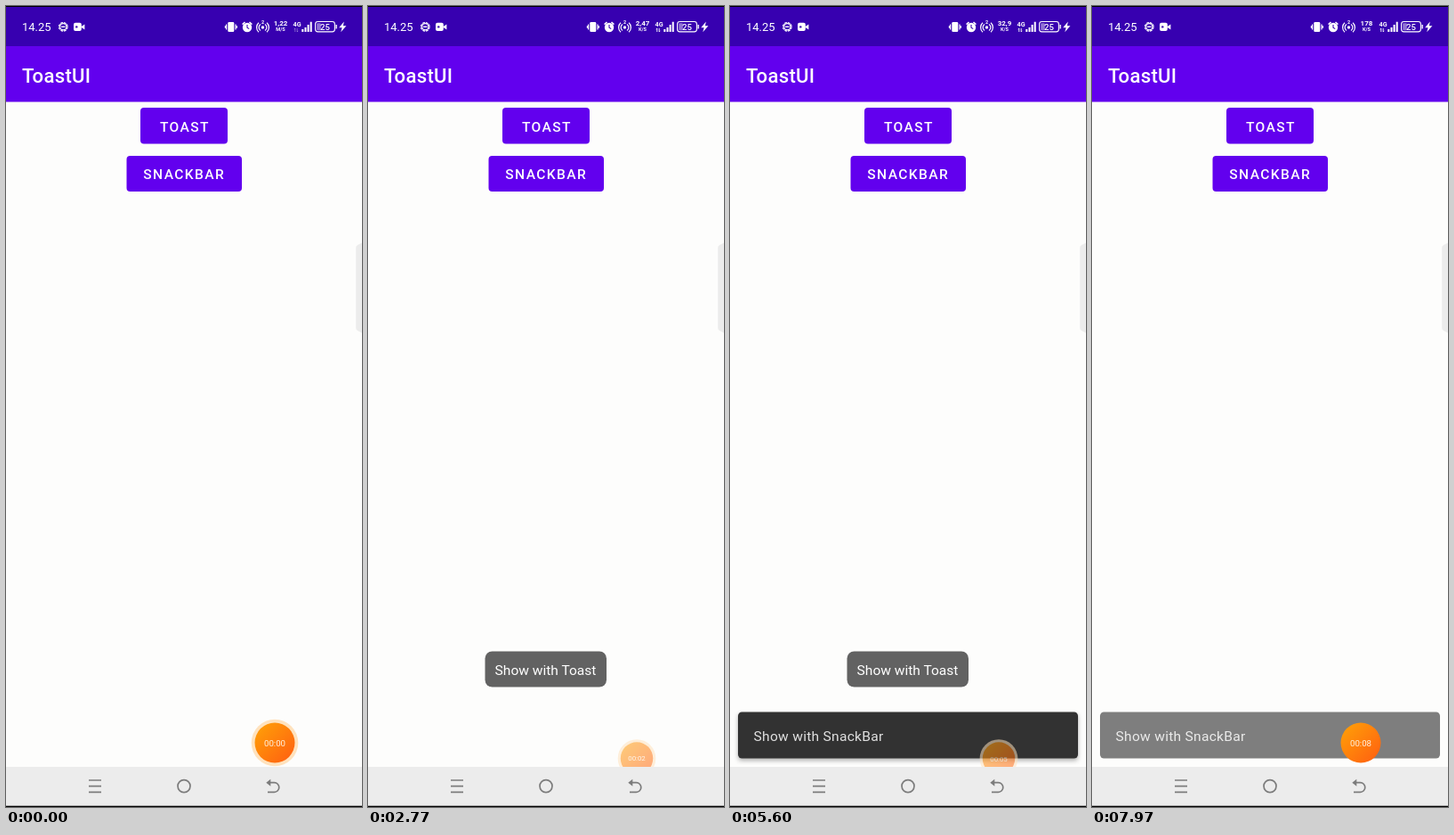
Animation of 400 by 898 pixels, one loop 8030 ms. Source, as an HTML page:

```html
<!DOCTYPE html>
<html lang="en">
<head>
<meta charset="utf-8">
<title>Toast and snackbar</title>
<style>
  html, body { margin: 0; width: 100%; height: 100%; overflow: hidden; background: #fdfdfc; }
  svg { display: block; width: 100%; height: 100%; }
  text { font-family: Roboto, sans-serif; fill: #fff; }
  .label { font-size: 15.55px; font-weight: 500; letter-spacing: 1.39px; }
  .message { font-size: 15.55px; }
  .mid { text-anchor: middle; }
  .bold { font-weight: 700; }
  .line { fill: none; stroke: #fff; }
  .nav { fill: none; stroke: #7c7c7c; stroke-width: 1.7; }
</style>
</head>
<body>
<svg viewBox="0 0 400 898">
  <defs>
    <linearGradient id="orange" x1="0" y1="0" x2="1" y2="1">
      <stop offset=".1" stop-color="#ff9c08"/>
      <stop offset=".9" stop-color="#ff6410"/>
    </linearGradient>
    <filter id="blur" x="-20%" y="-50%" width="140%" height="200%"><feGaussianBlur stdDeviation="2.5"/></filter>
    <clipPath id="aboveNav"><rect width="400" height="853"/></clipPath>
    <clipPath id="toastClip"><rect x="151" y="114" width="98" height="40.5" rx="4"/></clipPath>
    <clipPath id="snackClip"><rect x="135.5" y="168" width="129.5" height="40" rx="4"/></clipPath>
  </defs>

  <rect width="400" height="898" fill="#fdfdfc"/>
  <rect width="400" height="46" fill="#3700b0"/>
  <rect y="45" width="400" height="62.5" fill="#6200ee"/>
  <rect width="400" height="1" fill="#000"/>
  <text x="18" y="85.5" font-size="22.2" font-weight="500" letter-spacing=".28">ToastUI</text>

  <!-- status bar -->
  <text x="18" y="28" font-size="13">14.25</text>
  <g class="line" stroke-width="1.2">
    <circle cx="64.3" cy="23.3" r="4.8" stroke-dasharray="2.8 .97"/>
    <circle cx="64.3" cy="23.3" r="3.6"/>
    <path d="M62.2 23.3h4.2" stroke-width="1.4"/>
  </g>
  <rect x="76" y="18.8" width="8.8" height="9.2" rx="2" fill="#fff"/>
  <path d="M84 23.4l4.4-3v6z" fill="#fff"/>
  <circle cx="79.3" cy="23.4" r="1.2" fill="#3700b0"/>
  <rect x="249.3" y="18" width="7" height="11" rx="1.3" fill="#fff"/>
  <path class="line" stroke-width="1.2" d="M247.6 20.5v6M258 20.5v6M246.4 22.3v2.4M259.4 22.3v2.4"/>
  <circle cx="271" cy="24" r="5.2" fill="#fff"/>
  <path class="line" stroke-width="1.5" d="M265.6 20.6l2.9-2.6M276.4 20.6l-2.9-2.6"/>
  <path class="line" style="stroke:#3700b0" stroke-width="1.1" d="M271 21v3.3l2.2 1.3"/>
  <circle cx="288.5" cy="24" r="1.7" fill="#fff"/>
  <path class="line" stroke-width="1.2" d="M286 27.4a4 4 0 0 1 0-6.8M291 27.4a4 4 0 0 0 0-6.8M284 29.2a6.8 6.8 0 0 1 0-10.4M293 29.2a6.8 6.8 0 0 0 0-10.4"/>
  <text class="mid bold" x="288.5" y="20" font-size="5.5">2</text>
  <text class="mid bold" id="rate" x="308.5" y="22.3" font-size="8"></text>
  <text class="mid bold" id="unit" x="308.5" y="28.3" font-size="5.6"></text>
  <text class="bold" x="322.6" y="22.6" font-size="7.2">4G</text>
  <path id="arrows" class="line" stroke-width=".9" d="M324.8 29v-4l-1 1.2M327.2 25v4l1-1.2"/>
  <path class="line" stroke-width="2" d="M333.3 29v-3M336.5 29v-5M339.6 29v-8M342.7 29v-11.3"/>
  <rect class="line" x="347.6" y="17.5" width="21.8" height="11.4" rx="2.8" stroke-width="1.1"/>
  <rect x="349.2" y="19.2" width="4.6" height="8" rx="1" fill="#fff" opacity=".45"/>
  <path class="line" stroke-width="1.4" d="M371.2 21v4.4"/>
  <text class="mid" x="358.4" y="26.7" font-size="9.6" font-weight="500">25</text>
  <path d="M379.8 17.4l-5.6 6.8h3.4l-1.4 5 6.2-7h-3.6z" fill="#fff"/>

  <!-- buttons -->
  <rect x="151" y="114" width="98" height="40.5" rx="4" fill="#6200ee"/>
  <circle id="toastRipple" cx="200" cy="134" fill="#fff" clip-path="url(#toastClip)"/>
  <text class="label" x="173" y="140.7">TOAST</text>
  <rect x="135.5" y="168" width="129.5" height="40" rx="4" fill="#6200ee"/>
  <circle id="snackRipple" cx="200" cy="188" fill="#fff" clip-path="url(#snackClip)"/>
  <text class="label" x="154.3" y="194.2">SNACKBAR</text>

  <path d="M400 265.5l-5 2.5q-1.8 1-1.8 3v90q0 2 1.8 3l5 2.5z" fill="#ececec"/>

  <g clip-path="url(#aboveNav)">
    <g id="snackbar">
      <rect id="shadow" x="9" y="794" width="382" height="52" rx="4" fill="#555" filter="url(#blur)"/>
      <rect x="9" y="791.5" width="382" height="52" rx="4.4" fill="#323232"/>
      <text class="message" x="26.6" y="823.5" letter-spacing=".28" style="fill:#e0e0e0">Show with SnackBar</text>
    </g>
    <g id="orb">
      <circle id="halo" r="26.3" fill="#ffe2bd"/>
      <circle r="22.5" fill="url(#orange)"/>
      <text id="clock" class="mid" y="3.6" font-size="9.7" style="fill:#fff3e4"></text>
    </g>
  </g>

  <g id="toast">
    <rect x="131.5" y="723.5" width="136.5" height="40" rx="8" fill="#626262"/>
    <text class="message" x="142.6" y="749.5">Show with Toast</text>
  </g>

  <!-- navigation bar -->
  <rect y="853" width="400" height="44" fill="#ececec"/>
  <rect y="896.7" width="400" height="1.3" fill="#000"/>
  <path class="nav" d="M93 868h14M93 874.7h14M93 881.4h14"/>
  <circle class="nav" cx="200" cy="874.6" r="7"/>
  <path class="nav" d="M295 870.7h6.5a5.2 5.2 0 0 1 0 10.6H294"/>
  <path d="M292.3 870.7l5-4v8z" fill="#7c7c7c"/>
</svg>

<script>
const LOOP = 8030;
const el = Object.fromEntries([...document.querySelectorAll('svg [id]')].map(e => [e.id, e]));

const linear = p => p;
const easeOut = p => 1 - (1 - p) ** 2;
const decelerate = p => 1 - (1 - p) ** 3;

// Interpolated value at time t from [time, value] steps.
function track(t, steps, ease = linear) {
  const i = steps.findIndex(s => s[0] > t);
  if (i === 0) return steps[0][1];
  if (i < 0) return steps[steps.length - 1][1];
  const [t0, a] = steps[i - 1], [t1, b] = steps[i];
  return a + (b - a) * ease((t - t0) / (t1 - t0));
}

// Latest value whose time has come.
const held = (t, steps) => steps.filter(s => s[0] <= t).pop()[1];

const rates = [[0, '1,22 M/S'], [730, '0,00 B/S'], [2670, '2,47 K/S'], [4900, '32,9 K/S'], [6800, '178 K/S']];
const seconds = [[0, 0], [1030, 1], [2100, 2], [3200, 3], [3700, 4], [4770, 5], [5900, 6], [7900, 8]];

const orb = {
  y: [[0, 826], [1770, 826], [2470, 843.5], [5600, 843.5], [5900, 856], [7899, 856], [7900, 826]],
  size: [[0, 1], [1770, 1], [2470, .81], [5600, .81], [5900, 1.02], [7899, 1.02], [7900, 1]],
  alpha: [[0, 1], [30, 1], [570, .54], [7899, .54], [7900, 1]],
  halo: [[0, 1], [5600, 1], [5900, 0]]
};

function ripple(circle, t, start) {
  circle.setAttribute('r', track(t, [[start, 10], [start + 225, 72]], easeOut));
  circle.setAttribute('opacity', track(t, [[start, 0], [start + 100, .2], [start + 300, .05], [start + 600, 0]]));
}

function render(t) {
  const [rate, unit] = held(t, rates).split(' ');
  el.rate.textContent = rate;
  el.unit.textContent = unit;
  el.arrows.setAttribute('opacity', t < 2670 ? .4 : 1);

  ripple(el.toastRipple, t, 1770);
  ripple(el.snackRipple, t, 4770);

  el.toast.setAttribute('opacity', track(t, [[1860, 0], [2050, 1], [5600, 1], [5880, 0]]));

  const scale = track(t, [[5150, .8], [5310, 1]], decelerate);
  el.snackbar.setAttribute('transform', `translate(200 817.5) scale(${scale}) translate(-200 -817.5)`);
  el.snackbar.setAttribute('opacity', track(t, [[5150, 0], [5285, 1], [7890, 1], [7970, .62]]));
  el.shadow.setAttribute('opacity', track(t, [[5285, 0], [5400, .45], [7890, .45], [7930, 0]]));

  const y = track(t, orb.y, easeOut), size = track(t, orb.size, easeOut);
  el.orb.setAttribute('transform', `translate(302 ${y}) scale(${size})`);
  el.orb.setAttribute('opacity', track(t, orb.alpha));
  el.halo.setAttribute('opacity', track(t, orb.halo));
  el.clock.textContent = '00:0' + held(t, seconds);
}

const begin = performance.now();
function frame() {
  render((performance.now() - begin) % LOOP);
  requestAnimationFrame(frame);
}
frame();
</script>
</body>
</html>
```
